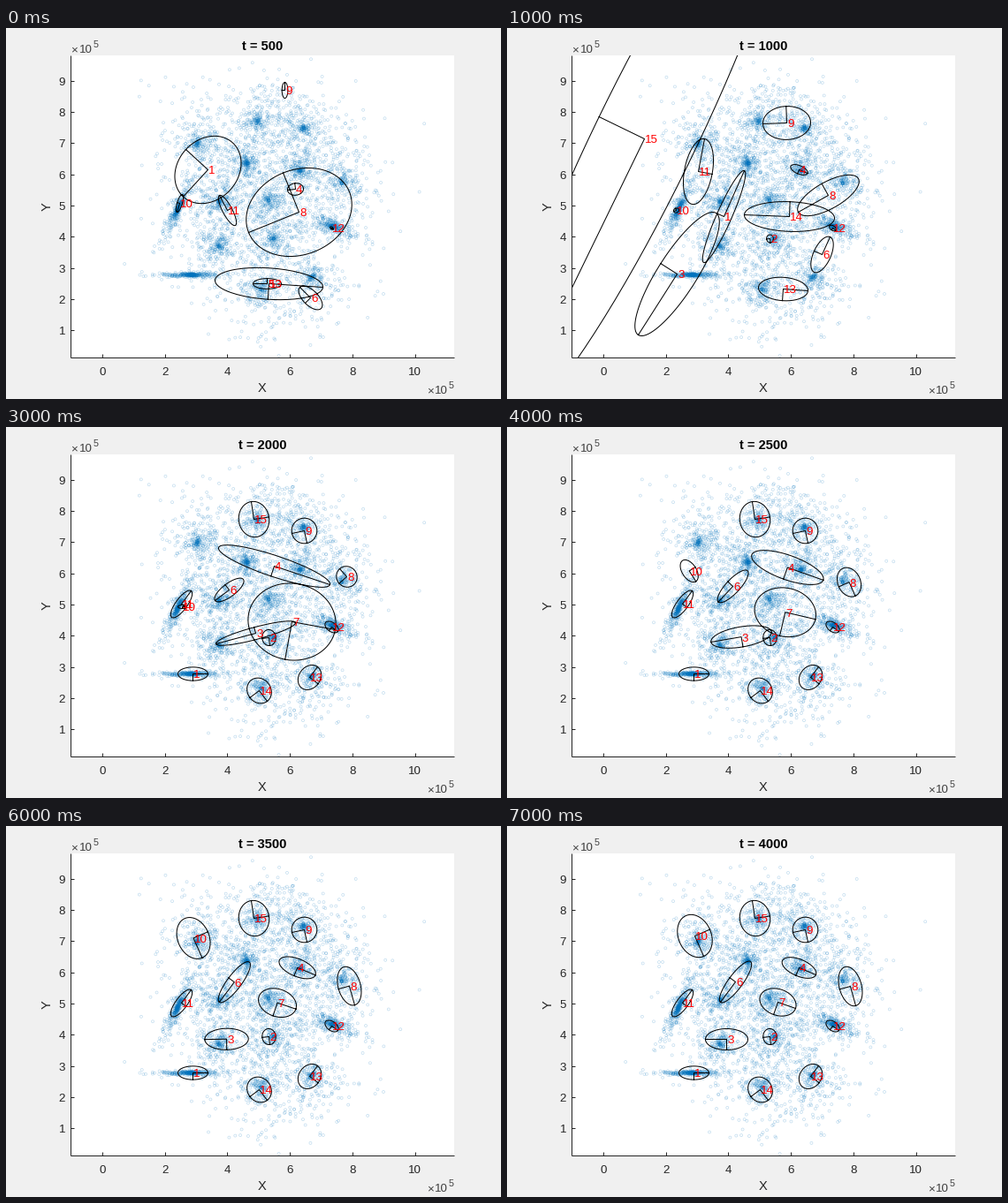
A matplotlib script for the animation above (8000 ms loop, 560 by 420 pixels).

```python
import numpy as np
import matplotlib.pyplot as plt
from matplotlib.animation import FuncAnimation
from matplotlib.patches import Rectangle

W, H, DPI = 560, 420, 100
PX = 72 / DPI                       # points per pixel
LEFT, RIGHT, TOP, BOTTOM = 73.5, 507, 31, 373
UNIT = 35.37                        # pixels per 1e5 data units
INK = "#262626"
STAGES = 8
plt.rcParams["font.family"] = "Liberation Sans"

fig = plt.figure(figsize=(W / DPI, H / DPI), dpi=DPI, facecolor="#f0f0f0")
ax = fig.add_axes([0, 0, 1, 1])
ax.set_xlim(0.5, W + 0.5)
ax.set_ylim(H - 0.5, -0.5)
ax.axis("off")


def label(x, y, s, size=13.33, ha="left", va="baseline", color=INK, **kw):
    return ax.text(x, y, s, fontsize=size * PX, ha=ha, va=va, color=color, **kw)


def rule(xs, ys):
    ax.plot(xs, ys, color=INK, lw=PX, solid_capstyle="butt", zorder=6)


# Plot area, ticks and labels
area = Rectangle((LEFT - 0.5, TOP - 0.5), RIGHT - LEFT + 0.5, BOTTOM - TOP + 1,
                 fc="white", ec="none", zorder=0)
ax.add_patch(area)
rule([LEFT, LEFT], [TOP, BOTTOM])
rule([LEFT, RIGHT], [BOTTOM, BOTTOM])
for k in range(0, 11, 2):
    x = 109.5 + k * UNIT
    rule([x, x], [BOTTOM, BOTTOM - 4])
    label(x, 392.5, str(k), ha="center")
for k in range(1, 10):
    y = 342 - (k - 1) * UNIT
    rule([LEFT, LEFT + 4], [y, y])
    label(67.5, y + 5, str(k), ha="right")
for x, y in ((74, 28), (476.5, 414)):
    label(x, y, "×", color="#404040")
    label(x + 9, y, "10", color="#404040")
    label(x + 25, y - 6, "5", 10.7, color="#404040")
label(290.5, 412, "X", 14.67, "center")
label(47, 202, "Y", 14.67, "center", "center", rotation=90)
title = label(290.7, 25, "", 14.67, "center", color="black", weight="bold")

# Point cloud: round clusters, then narrow ones as (centre, axis, thickness)
ROUND = [273+153j, 286+105j, 337+112j, 333+161j, 380+175j, 303+238j,
         241+247j, 242+196j, 217+130j, 347+281j, 289+295j, 298+195j]
NARROW = [(195+204j, -13+27j, 5), (211+279j, 28, 2.2), (370+224j, 25+9j, 9)]
rng = np.random.default_rng(7)


def cluster(centre, axis=40, across=40, n=333):
    """Points with a dense core and a wide halo."""
    along = axis * rng.normal(size=n)
    side = 1j * axis / abs(axis) * across * rng.normal(size=n)
    return centre + rng.random(n) * (along + side)


cloud = np.concatenate([cluster(c) for c in ROUND] + [cluster(*c) for c in NARROW])
dots = ax.scatter(cloud.real, cloud.imag, s=(3 * PX) ** 2, facecolors="none",
                  edgecolors="#0072bd", linewidths=0.67 * PX, alpha=0.25, zorder=1)
dots.set_clip_path(area)

# Ellipses: number -> (centre, drawn semi-axis, signed axis ratio)
SETTLED = {
    1: (212+279j, 17, .45), 2: (298+238j, 1+9j, .85), 3: (249+241j, -24, -.5),
    4: (331+160j, 19+8j, .46), 6: (259+176j, -17+23j, .28),
    7: (307+199j, 20+7j, .7), 8: (389+181j, 6+22j, .55),
    9: (338+117j, 3+14j, 1), 10: (213+124j, 10+23j, -.74),
    11: (199+200j, 11-15j, .35), 12: (369+226j, 7+5j, .6),
    13: (344+283j, 9-12j, .8), 14: (287+298j, 9+12j, .88),
    15: (281+104j, -3-20j, .85),
}


def stage(i, resting, wandering):
    """Wandering ellipses, plus the ones that only grow in their final place."""
    grow = min(1, 2.0 ** (i - 2))
    still = {n: (c, a * grow, r) for n, (c, a, r) in SETTLED.items() if n in resting}
    return still | wandering


def blend(start, end, w):
    out = {}
    for n, (c0, a0, r0) in start.items():
        c1, a1, r1 = end[n]
        if (a0 * np.conj(a1)).real < 0:
            a0 = -a0
        r0 = np.copysign(r0, r1)
        out[n] = tuple((1 - w) * p + w * q for p, q in zip((c0, a0, r0), (c1, a1, r1)))
    return out


states = [
    stage(0, {12}, {
        1: (229+160j, -28+30.5j, .82), 8: (332+208j, -57+23j, .78),
        4: (328+182j, -9+1j, .75), 9: (316+70j, -9j, -.37),
        10: (197+198j, -3+10j, .28), 11: (251+206j, -9-17j, .28),
        13: (298+289j, 61+4j, .29), 5: (296+289j, -16, .37),
        6: (345+305j, -12-12j, -.5)}),
    stage(1, {2, 4, 12}, {
        15: (156+125j, -160+329j, .156), 9: (317+107j, -27+1j, .7),
        11: (217+162j, 7-37j, .42), 10: (192+206j, -3+1j, .8),
        8: (364+189j, -34+19j, .39), 14: (320+213j, -51-2j, .33),
        6: (357+256j, 9-20j, -.45), 1: (246+213j, 23-52j, -.15),
        3: (193+278j, -44+69j, .27), 13: (313+295j, 28+2j, .47)}),
    stage(2, {2, 9, 11, 12, 13}, {
        15: (217+123j, -22-20j, .96), 4: (300+117j, -44+28j, -.45),
        6: (293+158j, -3-33j, .55), 10: (206+201j, -1+8j, .9),
        3: (284+215j, -33-8j, .52), 8: (383+173j, -12+7j, .65),
        1: (216+268j, 12-19j, .3), 14: (278+289j, 21+15j, -.4)}),
    stage(3, {1, 2, 9, 11, 12, 13, 14, 15}, {
        4: (304+157j, 63+21j, .18), 6: (253+184j, -16+12j, .37),
        10: (200+203j, 5, .4), 7: (324+220j, 49+9j, .87),
        3: (283+233j, -45+12j, .15), 8: (386+169j, -8-9j, -.95)}),
]
# From here on every ellipse eases into its settled place
for i in range(4, STAGES):
    left = (STAGES - 1 - i) / 4
    states.append(blend(states[3], SETTLED, 1 - left ** 2.5))

outline, = ax.plot([], [], color="black", lw=PX, zorder=3)
outline.set_clip_path(area)
turn = np.linspace(0, 2 * np.pi, 90)
numbers = []


def draw(i):
    title.set_text(f"t = {500 * (i + 1)}")
    while numbers:
        numbers.pop().remove()
    xs, ys = [], []
    for n, (centre, major, ratio) in states[i].items():
        minor = 1j * major * ratio
        ring = centre + major * np.cos(turn) + minor * np.sin(turn)
        arms = np.array([centre + major, centre, centre + minor])
        for part in (ring, arms):
            xs += [*part.real, np.nan]
            ys += [*part.imag, np.nan]
        numbers.append(label(centre.real + 0.5, centre.imag + 5, str(n),
                             color="red", zorder=4))
    outline.set_data(xs, ys)
    return [title, outline, *numbers]


anim = FuncAnimation(fig, draw, frames=STAGES, interval=1000,
                     init_func=lambda: [], repeat=True, repeat_delay=0)
plt.show()
```
